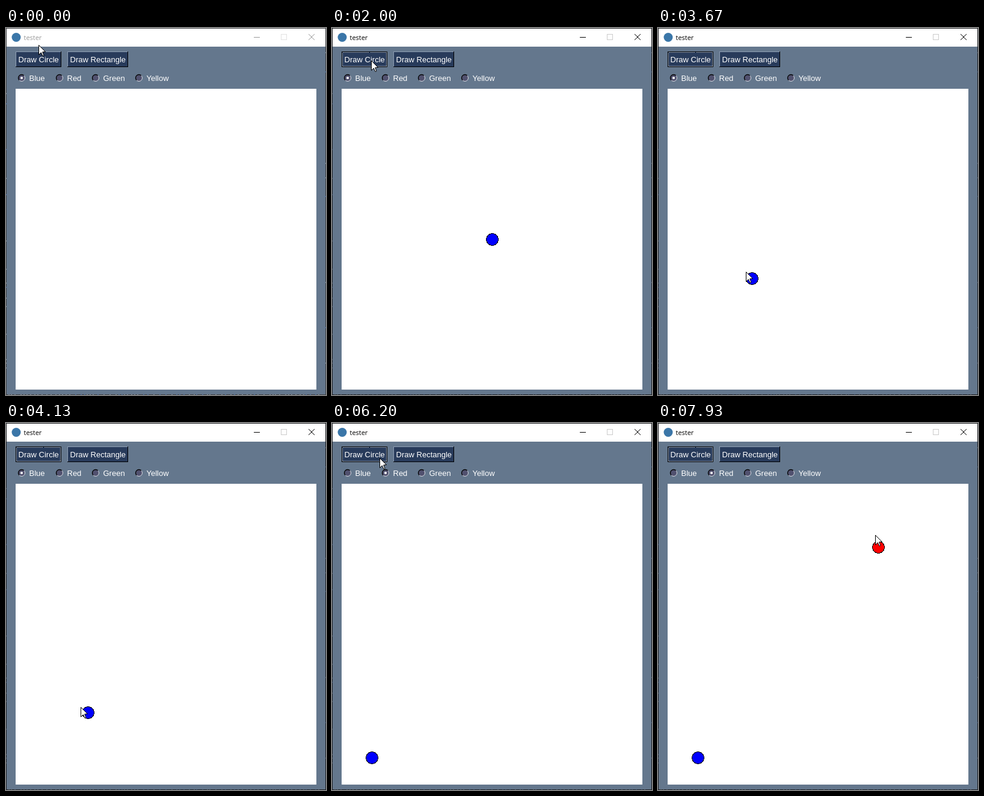
An HTML page for the animation above (8 s loop, 532 by 610 pixels).

```html
<!DOCTYPE html>
<html lang="en">
<head>
<meta charset="utf-8">
<title>tester</title>
<style>
  html, body { margin: 0; width: 100%; height: 100%; overflow: hidden; background: #64778d; }
  svg { display: block; width: 532px; height: 610px; }
  text { font: 13px "Liberation Sans", Arial, sans-serif; fill: #fff; white-space: pre; }
  #title { font: 11px "Open Sans", "Noto Sans", sans-serif; fill: #999; }
  .icon { stroke: #999; fill: none; }
  .disabled { stroke: #e2e2e2; fill: none; }
  .frame { fill: #3f4144; }
  .light { stroke: #8d9db2; fill: none; }
  .dark { stroke: #000; fill: none; }
  .focus { display: none; fill: none; stroke: #dfe4ea; stroke-dasharray: 1 1; }
  .crisp { shape-rendering: crispEdges; }
  .active #title { fill: #000; }
  .active .icon { stroke: #000; }
  .active .disabled { stroke: #ccc; }
  .active .frame { fill: #1d1f22; }
  .active #specks { opacity: .4; }
  .active .focus { display: inline; }
  .active #DrawCircle .light { stroke: #000; }
  .pressed text { transform: translate(1px, 1px); }
</style>
</head>
<body>
<svg id="stage" viewBox="0 0 532 610">
  <rect class="frame" width="532" height="610"/>
  <g id="specks" class="crisp"></g>
  <rect x="1" y="1" width="530" height="608" fill="#64778d"/>
  <rect x="1" y="1" width="530" height="30" fill="#fff"/>
  <circle cx="17" cy="15.5" r="7.5" fill="#3a76a8"/>
  <text id="title" x="29.5" y="20">tester</text>
  <path class="icon crisp" d="M412 15.5h10"/>
  <rect class="disabled crisp" x="457.5" y="10.5" width="9" height="9"/>
  <path class="icon" d="M503 10l10 10m0-10l-10 10"/>
  <g id="controls"></g>
  <rect x="16" y="101" width="500" height="500" fill="#fff"/>
  <g id="discs" class="crisp" stroke="#000"></g>
  <path id="cursor" d="M.5 .5V16.5L4.3 12.8 7 18.5 9 17.6 6.7 11.9 11.5 11.5Z" fill="#fff" stroke="#000"/>
</svg>
<script>
const DURATION = 8000, FPS = 15;
const $ = id => document.getElementById(id);

const button = (label, x, width, focus) => `
  <g id="${label.replace(' ', '')}">
    <g class="crisp">
      <rect x="${x}" y="39" width="${width}" height="26" fill="#283b5b"/>
      <path class="light" d="M${x + .5} 64V39.5H${x + width - 1}"/>
      <path class="dark" d="M${x} 64.5H${x + width - .5}V39"/>
      ${focus ? `<rect class="focus" x="${x + 1.5}" y="40.5" width="${width - 3}" height="23"/>` : ''}
    </g>
    <text x="${x + 4.6}" y="57">${label}</text>
  </g>`;

const radio = (label, x) => `
  <circle cx="${x}" cy="83" r="5.5" fill="#51516f"/>
  <path d="M${x - 3.9} 86.9a5.5 5.5 0 0 1 7.8-7.8" fill="none" stroke="#000" stroke-width="1.3"/>
  <path d="M${x + 3.9} 79.1a5.5 5.5 0 0 1-7.8 7.8" fill="none" stroke="#d5dae0"/>
  <circle id="dot${label}" cx="${x}" cy="83" r="2.1" fill="#fff" visibility="hidden"/>
  <text x="${x + 12.5}" y="88">${label}</text>`;

$('controls').innerHTML =
  button('Draw Circle', 16, 76, true) + button('Draw Rectangle', 102, 101) +
  radio('Blue', 26) + radio('Red', 89) + radio('Green', 149) + radio('Yellow', 221);

// Faint desktop showing through the one-pixel window border
let seed = 7;
const random = () => (seed = seed * 16807 % 2147483647) / 2147483647;
const speck = (x, y, w, h) =>
  `<rect x="${x}" y="${y}" width="${w}" height="${h}" fill="${random() < .3 ? '#4a6a9c' : '#80868c'}"/>`;
let specks = '';
for (let i = 0; i < 24; i++) specks += speck(i % 3 ? 0 : 531, Math.floor(40 + random() * 560), 1, 2);
for (let x = 4; x < 525; x += 4 + Math.floor(random() * 7)) specks += speck(x, 609, 2, 1);
$('specks').innerHTML = specks;

// Each move ends at a point; the cursor rests until the next one starts
const HOME = [54, 28];
const moves = [
  { from: 0, until: 670, to: [116, 98] },
  { from: 670, until: 1000, to: [94, 81] },
  { from: 1200, until: 1670, to: [65, 54] },
  { from: 2200, until: 2730, to: [266, 349] },
  { from: 2800, until: 3200, to: [257, 361] },
  { from: 3200, until: 3670, to: [146, 405] },
  { from: 3670, until: 4130, to: [124, 472] },
  { from: 4130, until: 4470, to: [56, 544] },
  { from: 4600, until: 4800, to: [139, 200] },
  { from: 4800, until: 4930, to: [103, 66] },
  { from: 5200, until: 5600, to: [113, 83] },
  { from: 5730, until: 6330, to: [70, 51] },
  { from: 6600, until: 7270, to: [260, 338] },
  { from: 7270, until: 7530, to: [269, 347] },
  { from: 7600, until: 7930, to: [361, 186] }
];
const discs = [
  { fill: '#00f', press: 1870, born: 2000, grab: 2870, drop: 4470, offset: [10, 10] },
  { fill: '#f00', press: 6470, born: 6600, grab: 7670, drop: 7930, offset: [5, 19] }
];
const ACTIVATED = 1870, RED_CHOSEN = 5670;

for (const disc of discs) {
  $('discs').insertAdjacentHTML('beforeend', `<circle r="10" fill="${disc.fill}"/>`);
  disc.node = $('discs').lastElementChild;
}

const show = (node, visible) => node.setAttribute('visibility', visible ? 'visible' : 'hidden');
const place = (node, [x, y]) => node.setAttribute('transform', `translate(${x} ${y})`);
const snap = v => Math.round((v - 1) / 5) * 5 + 1.5;

function cursorAt(time) {
  let point = HOME;
  for (const { from, until, to } of moves) {
    if (time < from) break;
    const k = Math.min(1, (time - from) / (until - from));
    point = point.map((v, i) => v + (to[i] - v) * k);
  }
  return point.map(Math.round);
}

// A disc appears in the middle, then follows the cursor on a five-pixel grid
function discAt({ grab, drop, offset }, time) {
  if (time < grab) return [266.5, 351.5];
  return cursorAt(Math.min(time, drop)).map((v, i) => snap(v + offset[i]));
}

function draw(now) {
  const step = Math.floor((now % DURATION + 4) * FPS / 1000) % (DURATION * FPS / 1000);
  const time = Math.round(step * 100 / FPS) * 10;
  $('stage').classList.toggle('active', time >= ACTIVATED);
  $('DrawCircle').classList.toggle('pressed', discs.some(d => time >= d.press && time < d.born));
  show($('dotBlue'), time < RED_CHOSEN);
  show($('dotRed'), time >= RED_CHOSEN);
  for (const disc of discs) {
    show(disc.node, time >= disc.born);
    place(disc.node, discAt(disc, time));
  }
  place($('cursor'), cursorAt(time));
}

const start = performance.now();
function tick() {
  draw(performance.now() - start);
  requestAnimationFrame(tick);
}
tick();
</script>
</body>
</html>
```
